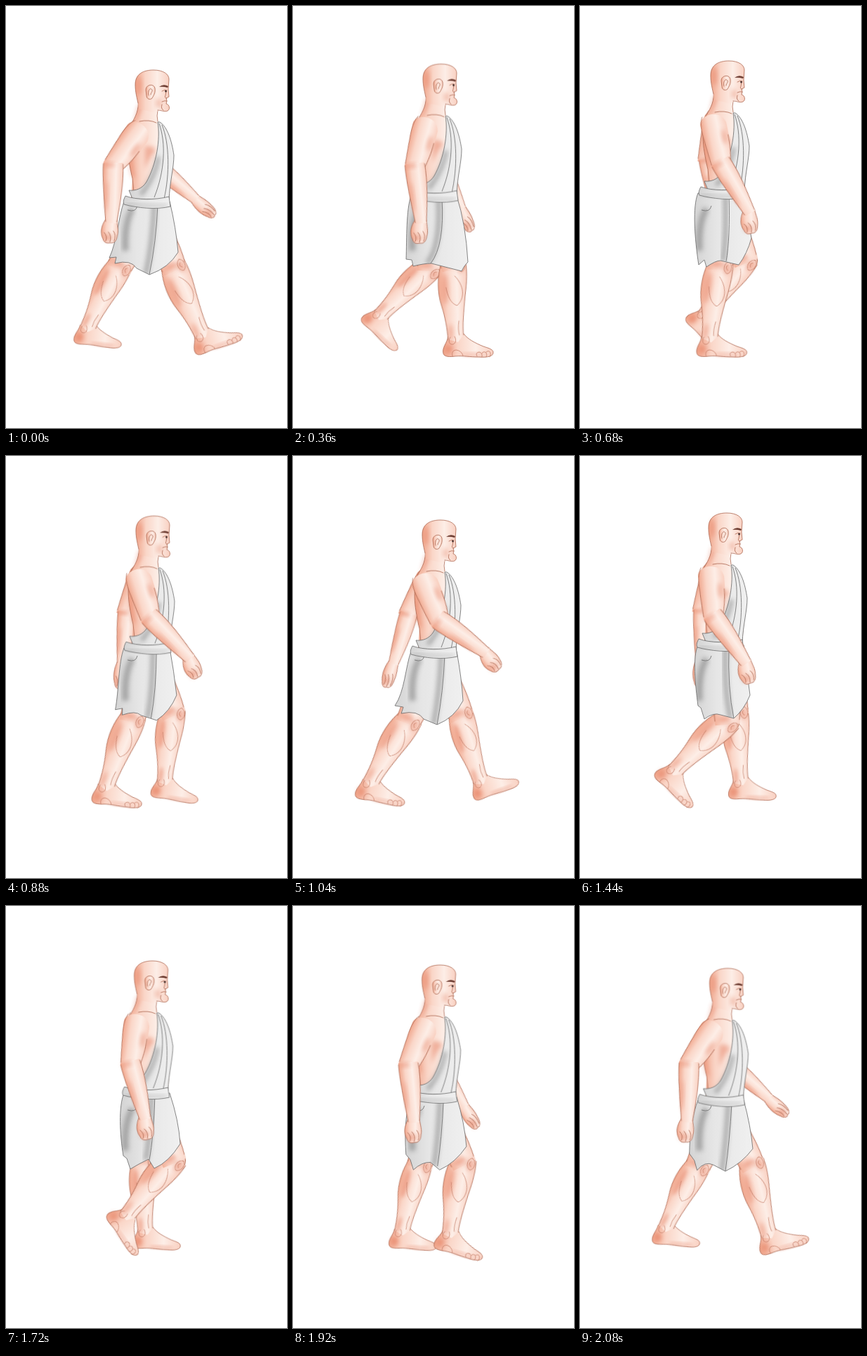
An HTML page without scripts for the animation above (2120 ms loop, 400 px wide and 600 px high).

```html
<!DOCTYPE html>
<html lang="en">
<head>
<meta charset="utf-8">
<title>Walking man</title>
<style>
html, body { margin: 0; width: 100%; height: 100%; overflow: hidden; background: #fff; }
svg { display: block; width: 400px; height: 600px; }

.skin { fill: url(#skin); }
.cloth { fill: url(#cloth); stroke: #686868; stroke-width: .8; stroke-linejoin: round; }
.line { fill: none; stroke: #ad6650; stroke-width: .8; stroke-linecap: round; stroke-linejoin: round; }
.thin { fill: none; stroke: #c0755e; stroke-width: .7; stroke-linecap: round; }
.crease { fill: none; stroke: #6a6a6a; stroke-width: .8; }
.blush { fill: #e06a48; opacity: .42; filter: url(#soft); }
.shade { fill: none; stroke: #707070; opacity: .5; filter: url(#soft); }

.anim { animation: 2120ms linear infinite; }
.body { animation-name: body; }
.skirt { animation-name: skirt; }
.fold { animation-name: fold; }
.n-knee { animation-name: n-knee; }
.n-thigh { animation-name: n-thigh; }
.n-shin { animation-name: n-shin; }
.n-foot { animation-name: n-foot; }
.f-knee { animation-name: f-knee; }
.f-thigh { animation-name: f-thigh; }
.f-shin { animation-name: f-shin; }
.f-foot { animation-name: f-foot; }
.n-arm { animation-name: n-arm; }
.n-elbow { animation-name: n-elbow; }
.n-hand { animation-name: n-hand; }
.f-arm { animation-name: f-arm; }
.f-elbow { animation-name: f-elbow; }

@keyframes body {
  0%, 49.06%, 100% { transform: translate(0, 0); }
  5.66% { transform: translate(0, 1.5px); }
  16.98% { transform: translate(1px, -8.5px); }
  32.08% { transform: translate(2px, -13px); }
  54.72% { transform: translate(-.5px, 1px); }
  67.92% { transform: translate(-1px, -10px); }
  81.13% { transform: translate(-1.5px, -13px); }
  98.11% { transform: translate(.5px, -2.5px); }
}
@keyframes skirt {
  0%, 100% { d: path("M168 278C160 300 158 335 147 358L157 357L155 366Q178 360 186 373L204 382Q232 372 245 350Q242 315 233 278Z"); }
  16.98% { d: path("M168 270C161 290 162 330 161 360L169 361L171 370Q186 366 197 366L240 377Q243 370 249 364Q246 310 233 270Z"); }
  32.08% { d: path("M168 266C160 285 163 330 169 368L177 361L180 371Q193 362 200 362L226 368Q238 352 244 330Q238 295 233 266Z"); }
  49.06% { d: path("M168 278C160 300 159 335 145 355L157 357L154 366Q178 361 186 374L205 382Q230 372 242 348Q240 315 233 278Z"); }
  67.92% { d: path("M168 269C160 285 164 325 168 355L172 358L177 374Q190 364 200 368L219 373Q234 360 242 340Q238 310 233 269Z"); }
  81.13% { d: path("M168 266C160 285 162 325 167 355L172 359L177 374Q190 366 203 360L211 373Q232 364 248 338Q246 305 233 266Z"); }
  98.11% { d: path("M168 276C160 295 156 325 156 352L163 362L167 376Q178 362 190 368L207 377Q230 366 246 345Q243 312 233 276Z"); }
}
@keyframes fold {
  0%, 100% { d: path("M216 282Q214 335 204 382"); }
  16.98% { d: path("M212 274Q216 340 196 366"); }
  32.08% { d: path("M212 268Q214 330 208 363"); }
  49.06% { d: path("M216 282Q214 335 205 382"); }
  67.92% { d: path("M212 272Q210 330 219 373"); }
  81.13% { d: path("M212 268Q210 330 204 361"); }
  98.11% { d: path("M216 280Q213 335 207 377"); }
}

/* near leg */
@keyframes n-knee {
  0%, 100% { transform: translate(239px, 373px); }
  5.66% { transform: translate(240px, 370px); }
  16.98% { transform: translate(228px, 370px); }
  32.08% { transform: translate(199px, 371px); }
  49.06% { transform: translate(164px, 377px); }
  54.72% { transform: translate(175px, 379px); }
  67.92% { transform: translate(209px, 378px); }
  81.13% { transform: translate(238px, 362px); }
  98.11% { transform: translate(245px, 368px); }
}
@keyframes n-thigh {
  0%, 100% { transform: rotate(-24.6deg); }
  5.66% { transform: rotate(-26deg); }
  16.98% { transform: rotate(-16deg); }
  32.08% { transform: rotate(1deg); }
  49.06% { transform: rotate(22deg); }
  54.72% { transform: rotate(15deg); }
  67.92% { transform: rotate(-4deg); }
  81.13% { transform: rotate(-23deg); }
  98.11% { transform: rotate(-29deg); }
}
@keyframes n-shin {
  0%, 100% { transform: rotate(-22.8deg); }
  5.66% { transform: rotate(-13deg); }
  16.98% { transform: rotate(-1.7deg); }
  32.08% { transform: rotate(8.5deg); }
  49.06% { transform: rotate(32deg); }
  54.72% { transform: rotate(39deg); }
  67.92% { transform: rotate(47.4deg); }
  81.13% { transform: rotate(40.7deg); }
  98.11% { transform: rotate(-12.8deg); }
}
@keyframes n-foot {
  0%, 100% { transform: rotate(2.8deg); }
  5.66% { transform: rotate(11deg); }
  16.98% { transform: rotate(1.7deg); }
  32.08% { transform: rotate(-8.5deg); }
  49.06% { transform: rotate(-22deg); }
  54.72% { transform: rotate(-17deg); }
  67.92% { transform: rotate(-5deg); }
  81.13% { transform: rotate(14deg); }
  98.11% { transform: rotate(-3deg); }
}

/* far leg */
@keyframes f-knee {
  0%, 100% { transform: translate(161px, 371px); }
  7.55% { transform: translate(166px, 376px); }
  16.98% { transform: translate(194px, 373px); }
  32.08% { transform: translate(235px, 362px); }
  49.06% { transform: translate(239px, 369px); }
  54.72% { transform: translate(237px, 366px); }
  67.92% { transform: translate(222px, 366px); }
  81.13% { transform: translate(196px, 365px); }
  98.11% { transform: translate(167px, 371px); }
}
@keyframes f-thigh {
  0%, 100% { transform: rotate(25deg); }
  7.55% { transform: rotate(20deg); }
  16.98% { transform: rotate(4deg); }
  32.08% { transform: rotate(-22deg); }
  49.06% { transform: rotate(-25deg); }
  54.72% { transform: rotate(-24deg); }
  67.92% { transform: rotate(-13deg); }
  81.13% { transform: rotate(3deg); }
  98.11% { transform: rotate(21deg); }
}
@keyframes f-shin {
  0%, 100% { transform: rotate(27.8deg); }
  7.55% { transform: rotate(40deg); }
  16.98% { transform: rotate(46.6deg); }
  32.08% { transform: rotate(36.9deg); }
  49.06% { transform: rotate(-16.4deg); }
  54.72% { transform: rotate(-10.6deg); }
  67.92% { transform: rotate(-3.7deg); }
  81.13% { transform: rotate(-1deg); }
  98.11% { transform: rotate(28deg); }
}
@keyframes f-foot {
  0%, 100% { transform: rotate(-22deg); }
  7.55% { transform: rotate(-16deg); }
  16.98% { transform: rotate(-4deg); }
  32.08% { transform: rotate(8deg); }
  49.06% { transform: rotate(-4deg); }
  54.72% { transform: rotate(9deg); }
  67.92% { transform: rotate(5deg); }
  81.13% { transform: rotate(3deg); }
  98.11% { transform: rotate(-24deg); }
}

/* arms */
@keyframes n-arm {
  0%, 100% { transform: rotate(36.5deg); }
  16.98% { transform: rotate(14.5deg); }
  32.08% { transform: rotate(-12deg); }
  49.06% { transform: rotate(-22deg); }
  67.92% { transform: rotate(-4deg); }
  81.13% { transform: rotate(8deg); }
  98.11% { transform: rotate(34deg); }
}
@keyframes n-elbow {
  0%, 100% { transform: rotate(-34.5deg); }
  16.98% { transform: rotate(-20.5deg); }
  32.08% { transform: rotate(-18deg); }
  49.06% { transform: rotate(-33deg); }
  67.92% { transform: rotate(-31deg); }
  81.13% { transform: rotate(-23deg); }
  98.11% { transform: rotate(-32deg); }
}
@keyframes n-hand {
  0%, 98.11%, 100% { transform: rotate(2deg); }
  16.98% { transform: rotate(10deg); }
  32.08% { transform: rotate(24deg); }
  49.06% { transform: rotate(16deg); }
  67.92% { transform: rotate(22deg); }
  81.13% { transform: rotate(8deg); }
}
@keyframes f-arm {
  0%, 100% { transform: rotate(-24deg); }
  16.98% { transform: rotate(-15deg); }
  32.08% { transform: rotate(12deg); }
  49.06% { transform: rotate(29deg); }
  67.92% { transform: rotate(17deg); }
  81.13% { transform: rotate(-2deg); }
  98.11% { transform: rotate(-23deg); }
}
@keyframes f-elbow {
  0%, 98.11%, 100% { transform: rotate(-26deg); }
  16.98% { transform: rotate(-11deg); }
  32.08% { transform: rotate(-22deg); }
  49.06% { transform: rotate(-12deg); }
  67.92% { transform: rotate(-15deg); }
  81.13% { transform: rotate(-10deg); }
}
</style>
</head>
<body>
<svg viewBox="0 0 400 600">
<defs>
  <linearGradient id="skin">
    <stop offset="0" stop-color="#f0a68c"/>
    <stop offset=".3" stop-color="#fad6c8"/>
    <stop offset=".65" stop-color="#fdeee7"/>
    <stop offset="1" stop-color="#f9d0c1"/>
  </linearGradient>
  <linearGradient id="cloth">
    <stop offset="0" stop-color="#d4d4d4"/>
    <stop offset=".4" stop-color="#e6e6e6"/>
    <stop offset="1" stop-color="#f0f0f0"/>
  </linearGradient>
  <filter id="soft" x="-60%" y="-60%" width="220%" height="220%"><feGaussianBlur stdDeviation="3"/></filter>
  <clipPath id="in-skirt"><path class="anim skirt"/></clipPath>

  <g id="thigh">
    <path class="skin" d="M-20 -80L20 -80C22 -50 21 -20 18 4L-17 4C-17 -20 -20 -50 -20 -80Z"/>
    <path class="line" d="M20 -80C22 -50 21 -20 18 -2M-20 -80C-20 -50 -17 -20 -17 -2"/>
    <ellipse class="blush" cx="-3" cy="-4" rx="10" ry="5"/>
  </g>
  <g id="joint"><circle class="skin" r="17.5"/><circle class="line" r="17.5"/></g>
  <g id="shin">
    <path class="skin" d="M18 -6C20 8 19 22 16 42C13 66 11 84 12 98L4 108L-10 104C-11 88 -13 74 -18 56C-24 36 -23 14 -17 -4Z"/>
    <ellipse class="blush" cx="-12" cy="32" rx="4" ry="22"/>
    <ellipse class="blush" cx="-6" cy="94" rx="3" ry="12"/>
    <path class="line" d="M18 -6C20 8 19 22 16 42C13 66 11 84 12 98M-10 104C-11 88 -13 74 -18 56C-24 36 -23 14 -17 -4"/>
    <path class="thin" d="M2 14C15 28 16 46 4 56C-5 53 -9 42 -11 30M6 78Q4 90 6 98"/>
  </g>
  <g id="cap">
    <ellipse class="blush" cx="10" cy="1" rx="5" ry="8"/>
    <path class="thin" d="M12 -9c-7 1 -8 15 0 17c6 -2 7 -14 0 -17M11 -4q-4 4 1 7"/>
  </g>
  <g id="foot">
    <path class="skin" d="M-10 -4C-12 6 -19 12 -17 20C-16 25 -8 25 0 24C12 23 20 25 34 25C46 26 55 24 54 18C54 14 46 12 40 10C28 5 18 0 12 -8Z"/>
    <ellipse class="blush" cx="-9" cy="14" rx="6" ry="7"/>
    <ellipse class="blush" cx="26" cy="22" rx="18" ry="2"/>
    <path class="line" d="M-10 -4C-12 6 -19 12 -17 20C-16 25 -8 25 0 24C12 23 20 25 34 25C46 26 55 24 54 18C54 14 46 12 40 10C28 5 18 0 12 -8"/>
  </g>
  <path id="ankle" class="thin" d="M-7 -3c-4 6 -1 11 4 10c5 -2 4 -8 2 -11"/>
  <path id="toes" class="thin" d="M31 24q-3 -5 3 -6q5 1 4 7M38 20q2 -4 6 -1q2 4 0 6M44 18q4 -3 6 1q1 3 -1 6M-4 24q-2 -8 5 -9q8 1 10 8"/>

  <g id="upper">
    <path class="skin" d="M-18 0C-18 -16 14 -20 19 2C20 26 16 42 14 62L-14 62C-15 40 -18 20 -18 0Z"/>
    <ellipse class="blush" cx="12" cy="22" rx="3" ry="11"/>
    <path class="line" d="M-13 -12C-18 -4 -18 8 -17 20C-16 36 -15 48 -14 58M18 20C18 36 16 46 14 56"/>
  </g>
  <g id="fore">
    <path class="skin" d="M-14 -4C-15 18 -11 48 -8 82L8 82C12 52 16 24 14 -4Z"/>
    <ellipse class="blush" cx="-5" cy="-1" rx="8" ry="3"/>
    <ellipse class="blush" cx="-8" cy="44" rx="2" ry="22"/>
    <path class="line" d="M-14 -2C-15 18 -11 48 -8 80M8 80C12 52 16 24 14 -2"/>
  </g>
  <g id="hand">
    <path class="skin" d="M-8 -2C-14 8 -15 18 -10 26C-8 33 -2 32 1 31C7 32 10 26 10 20C12 14 9 6 8 -2Z"/>
    <ellipse class="blush" cx="-3" cy="24" rx="7" ry="5"/>
    <path class="line" d="M-8 -2C-14 8 -15 18 -10 26C-8 33 -2 32 1 31C7 32 10 26 10 20C12 14 9 6 8 -2"/>
    <path class="line" d="M-9 17q6 6 3 12M-3 16q6 6 3 14M4 14q5 6 2 14"/>
  </g>
</defs>

<g class="anim body">
  <g transform="translate(192 176)"><g class="anim f-arm">
    <use href="#upper"/>
    <g transform="translate(0 58)"><g class="anim f-elbow"><g transform="scale(.88)">
      <use href="#hand" transform="translate(0 79) scale(.9 1.35)"/>
      <use href="#fore"/>
    </g></g></g>
  </g></g>
</g>

<g class="anim f-knee">
  <use href="#joint"/>
  <g class="anim f-shin"><g transform="scale(.95)">
    <g transform="translate(0 104)"><g class="anim f-foot"><use href="#foot"/></g></g>
    <use href="#shin"/>
    <g transform="translate(0 104)"><g class="anim f-foot"><use href="#ankle"/></g></g>
  </g></g>
  <g class="anim f-thigh"><use href="#thigh"/></g>
  <g class="anim f-shin"><use href="#cap"/></g>
</g>

<g class="anim n-knee">
  <use href="#joint"/>
  <g class="anim n-shin">
    <g transform="translate(0 104)"><g class="anim n-foot"><use href="#foot"/><use href="#toes"/></g></g>
    <use href="#shin"/>
    <g transform="translate(0 104)"><g class="anim n-foot"><use href="#ankle"/></g></g>
  </g>
  <g class="anim n-thigh"><use href="#thigh"/></g>
  <g class="anim n-shin"><use href="#cap"/></g>
</g>

<path class="cloth anim skirt"/>
<g clip-path="url(#in-skirt)">
  <path class="shade" d="M180 288Q168 308 170 348" stroke-width="9"/>
  <g transform="translate(-5 0)"><path class="shade anim fold" stroke-width="7"/></g>
  <path class="crease anim fold"/>
  <path class="crease" d="M187 284Q185 294 173 290"/>
</g>

<g class="anim body">
  <path class="skin" d="M188 130C190 148 184 158 178 168C169 190 174 220 180 245L178 274L232 275L238 210C234 186 226 170 216 164C214 158 214 152 215 146Z"/>
  <path class="blush" d="M188 140L194 142Q192 156 181 166Q186 152 188 140Z"/>
  <path class="blush" d="M176 188Q180 230 184 246L178 240Q172 210 176 188Z"/>
  <path class="blush" d="M198 200Q212 198 213 206Q204 214 198 232Z"/>
  <path class="line" d="M188 132C190 148 184 158 178 168C169 190 174 220 180 245L182 264M216 148Q214 156 216 164M190 164Q204 161 214 166"/>

  <path class="cloth" d="M216 165C220 190 214 225 200 250C194 260 184 263 175 262L180 274L232 276C233 250 239 230 239 212C236 192 230 172 219 165Z"/>
  <path class="shade" d="M217 214Q212 244 192 268" stroke-width="6"/>
  <path class="crease" d="M218 167C228 195 226 235 211 272M222 169C233 195 233 240 225 274"/>
  <path class="cloth" d="M170 270C186 276 212 276 232 271L234 285C214 290 186 287 168 282C166 278 168 274 170 270Z"/>
  <path class="shade" d="M172 281Q200 286 230 283" stroke-width="2"/>

  <path class="skin" d="M188 136C185 126 184 118 184 112C184 96 196 91 210 91C224 91 232 97 232 104L231 118L232 129L228 131L229 135L228 139C233 140 234 147 230 149C226 151 221 148 217 147L214 152L189 146Z"/>
  <ellipse class="blush" cx="190" cy="113" rx="3" ry="13"/>
  <ellipse class="blush" cx="217" cy="138" rx="3" ry="7"/>
  <path class="line" d="M188 138C185 126 184 118 184 112C184 96 196 91 210 91C224 91 232 97 232 104L231 118L232 129L228 131L229 135L228 139C233 140 234 147 230 149C226 151 221 148 216 148"/>
  <path class="skin" d="M199 119c0 -8 12 -9 13 -2c1 7 -2 10 -4 14c-3 3 -8 1 -8 -3z"/>
  <path class="line" d="M199 119c0 -8 12 -9 13 -2c1 7 -2 10 -4 14c-3 3 -8 1 -8 -3zM203 127c-2 -6 2 -12 5 -8c1 3 -2 4 -2 7"/>
  <path d="M218 115Q224 110 231 114L230 116Q224 114 218 115Z" fill="#6b3b30"/>
  <path class="line" d="M222 121Q226 118 229 120M228 121L227 127Q225 131 229 131M222 136Q226 134 229 135M222 140Q220 146 224 148"/>
  <ellipse cx="227.5" cy="121" rx="1.3" ry="1.6" fill="#3d2a28"/>

  <g transform="translate(187 180)"><g class="anim n-arm">
    <use href="#upper"/>
    <g transform="translate(0 58)"><g class="anim n-elbow">
      <g transform="translate(0 79)"><g class="anim n-hand"><use href="#hand"/></g></g>
      <use href="#fore"/>
    </g></g>
  </g></g>
</g>
</svg>
</body>
</html>
```
